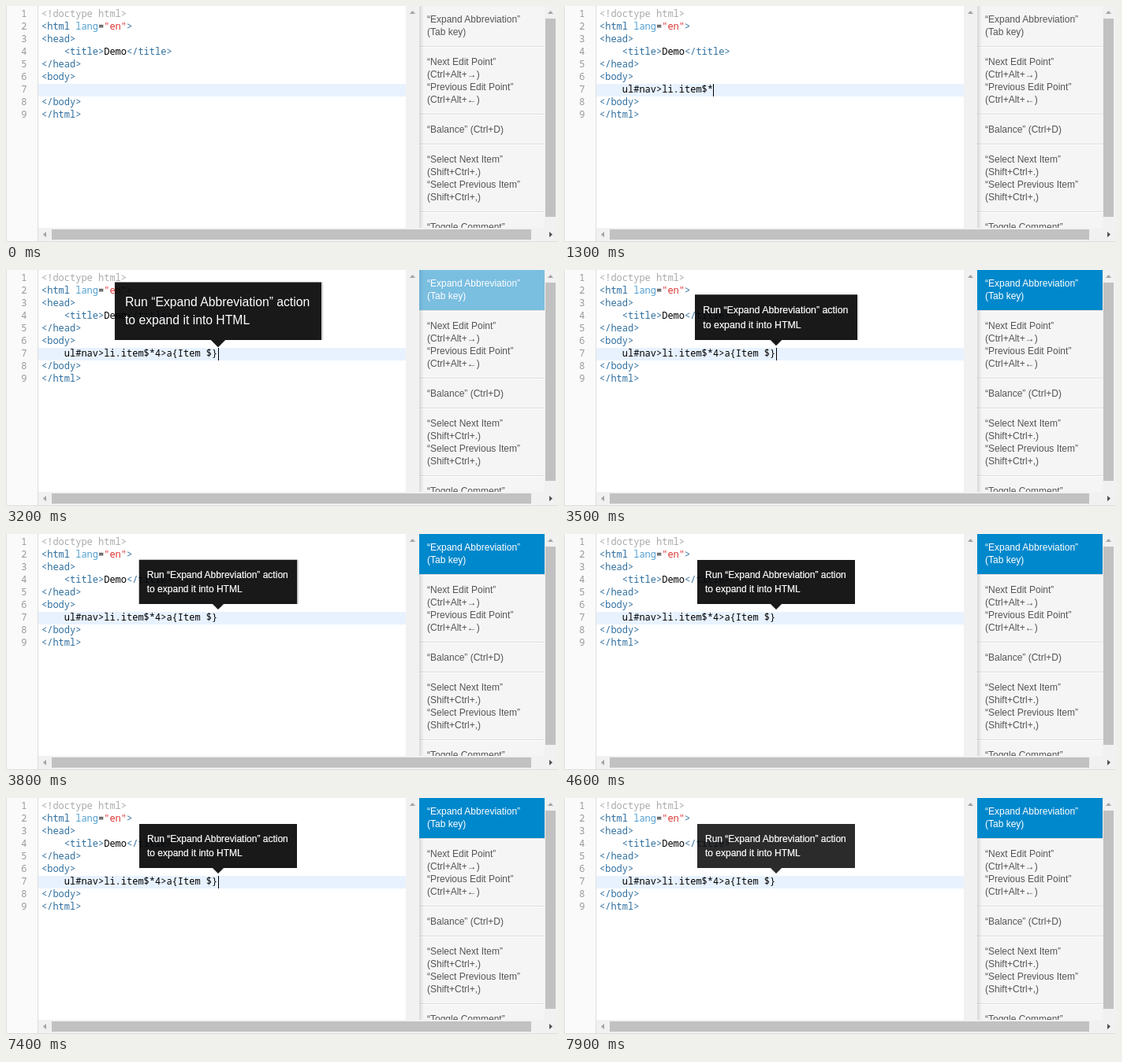
An HTML page for the animation above (8 s loop, 700x300 px).

```html
<!DOCTYPE html>
<html lang="en">
<head>
<meta charset="utf-8">
<title>Abbreviation demo</title>
<style>
  html, body { margin: 0; width: 100%; height: 100%; overflow: hidden; background: #fff; }
  svg { display: block; width: 700px; height: 300px; }
  text { white-space: pre; }
  .code { font: 12px "Noto Sans Mono", monospace; }
  .ui { font: 12px "Liberation Sans", Arial, sans-serif; }
</style>
</head>
<body>
<svg viewBox="0 0 700 300">
  <defs>
    <linearGradient id="shade">
      <stop offset="0" stop-opacity=".12"/>
      <stop offset="1" stop-opacity="0"/>
    </linearGradient>
    <clipPath id="view"><rect width="700" height="282"/></clipPath>
  </defs>
  <rect width="700" height="300" fill="#fff"/>
  <rect width="41" height="300" fill="#fafafa"/>
  <rect x="40" width="1" height="300" fill="#ddd"/>
  <rect x="41" y="99" width="466" height="16" fill="#e8f2ff"/>
  <g id="code" class="code"></g>
  <text id="typed" class="code" x="73.8" y="110"></text>
  <rect id="caret" y="99" width="1" height="16"/>

  <rect x="507" width="17" height="282" fill="#f1f1f1"/>
  <path d="M512 10h7l-3.500-4z" fill="#a3a3a3"/>

  <g clip-path="url(#view)">
    <rect x="524" width="159" height="282" fill="#f5f5f5"/>
    <g id="rules"></g>
    <rect x="524" width="6" height="282" fill="url(#shade)"/>
    <rect id="active" x="524" width="159" height="51" fill="#08c"/>
    <g id="list" class="ui"></g>
  </g>

  <rect x="683" width="17" height="282" fill="#f1f1f1"/>
  <path d="M687 10h7l-3.500-4z" fill="#a3a3a3"/>
  <rect x="684" y="16" width="13" height="252" fill="#c1c1c1"/>
  <rect x="41" y="282" width="659" height="17" fill="#f1f1f1"/>
  <rect x="58" y="284" width="608" height="13" fill="#c1c1c1"/>
  <path d="M51 287v7l-4-3.500z" fill="#a3a3a3"/>
  <path d="M689 287v7l4-3.500z" fill="#505050"/>
  <path d="M.5 0V299.500H700" fill="none" stroke="#ddd"/>

  <g id="tip">
    <path d="M169 33h200v56h-93l-7 7l-7-7h-93z" fill-opacity=".9"/>
    <rect id="edge" x="369.500" y="33" width="1" height="56" fill="#ccc"/>
    <g id="label" class="ui" fill="#fff" stroke="#fff">
      <text x="179" y="56">Run “Expand Abbreviation” action</text>
      <text x="179" y="74">to expand it into HTML</text>
    </g>
  </g>
</svg>
<script>
(() => {
  const LOOP = 8000, FRAME = 100;
  const ABBR = "ul#nav>li.item$*4>a{Item $}";
  const TAG = "#2f6f9f", ATTR = "#4f9fcf", STR = "#d33", META = "#aaa", INK = "#555";
  const byId = id => document.getElementById(id);
  const clamp = v => Math.max(0, Math.min(1, v));

  function add(parent, name, attrs, text = "") {
    const el = document.createElementNS("http://www.w3.org/2000/svg", name);
    for (const key in attrs) el.setAttribute(key, attrs[key]);
    el.textContent = text;
    parent.append(el);
    return el;
  }

  // Each line is a list of [text, colour] runs.
  const lines = [
    [["<!doctype html>", META]],
    [["<html ", TAG], ["lang", ATTR], ["=", "#000"], ['"en"', STR], [">", TAG]],
    [["<head>", TAG]],
    [["    <title>", TAG], ["Demo", "#000"], ["</title>", TAG]],
    [["</head>", TAG]],
    [["<body>", TAG]],
    [],
    [["</body>", TAG]],
    [["</html>", TAG]]
  ];
  lines.forEach((runs, i) => {
    const y = 14 + 16 * i;
    add(byId("code"), "text", { x: 26.4, y, "text-anchor": "end", fill: "#999" }, String(i + 1));
    const row = add(byId("code"), "text", { x: 45, y });
    for (const [text, fill] of runs) add(row, "tspan", { fill }, text);
  });

  const items = [
    ["“Expand Abbreviation”", "(Tab key)"],
    ["“Next Edit Point”", "(Ctrl+Alt+→)", "“Previous Edit Point”", "(Ctrl+Alt+←)"],
    ["“Balance” (Ctrl+D)"],
    ["“Select Next Item”", "(Shift+Ctrl+.)", "“Select Previous Item”", "(Shift+Ctrl+,)"],
    ["“Toggle Comment”"]
  ];
  let itemY = -2;
  const groups = items.map(rows => {
    const group = add(byId("list"), "g", { fill: INK });
    rows.forEach((row, j) => add(group, "text", { x: 534, y: itemY + 23 + 16 * j }, row));
    itemY += rows.length * 16 + 22;
    const rule = { x: 524, width: 159, height: 1 };
    add(byId("rules"), "rect", { ...rule, y: itemY - 1, fill: "#ddd" });
    add(byId("rules"), "rect", { ...rule, y: itemY, fill: "#fff" });
    return group;
  });

  function caretOn(t) {
    if (t < 200) return false;
    if (t < 2600) return true;
    if (t < 6100) return Math.floor((t - 2600) / 500) % 2 === 1;
    return t < 6900 || (t >= 7400 && t < 7900);
  }

  function draw(time) {
    const t = Math.floor(time / FRAME) * FRAME;

    const count = Math.max(0, Math.min(ABBR.length, Math.floor((t - 125) / 70)));
    byId("typed").textContent = ABBR.slice(0, count);
    byId("caret").setAttribute("x", Math.round(45 + 7.21 * (count + 4)));
    byId("caret").setAttribute("opacity", caretOn(t) ? 1 : 0);

    const age = t - 3050;
    byId("active").setAttribute("opacity", clamp(age / 300));
    groups[0].setAttribute("fill", age > 100 ? "#fff" : INK);

    // The tip shrinks from double size with an exponential ease-out.
    const extra = age < 950 ? 2 ** (-10 * Math.max(0, age) / 890) : 0;
    const fade = clamp(age / 150) * (1 - clamp((t - 7860) / 500));
    byId("tip").setAttribute("transform", `translate(269 89) scale(${1 + extra}) translate(-269 -89)`);
    byId("tip").setAttribute("opacity", fade);
    byId("edge").setAttribute("opacity", t < 4600 ? 1 : 0);
    byId("label").setAttribute("stroke-width", extra < 0.1 ? 0.2 : 0);
  }

  const start = performance.now();
  function tick() {
    draw((performance.now() - start) % LOOP);
    requestAnimationFrame(tick);
  }
  tick();
})();
</script>
</body>
</html>
```
